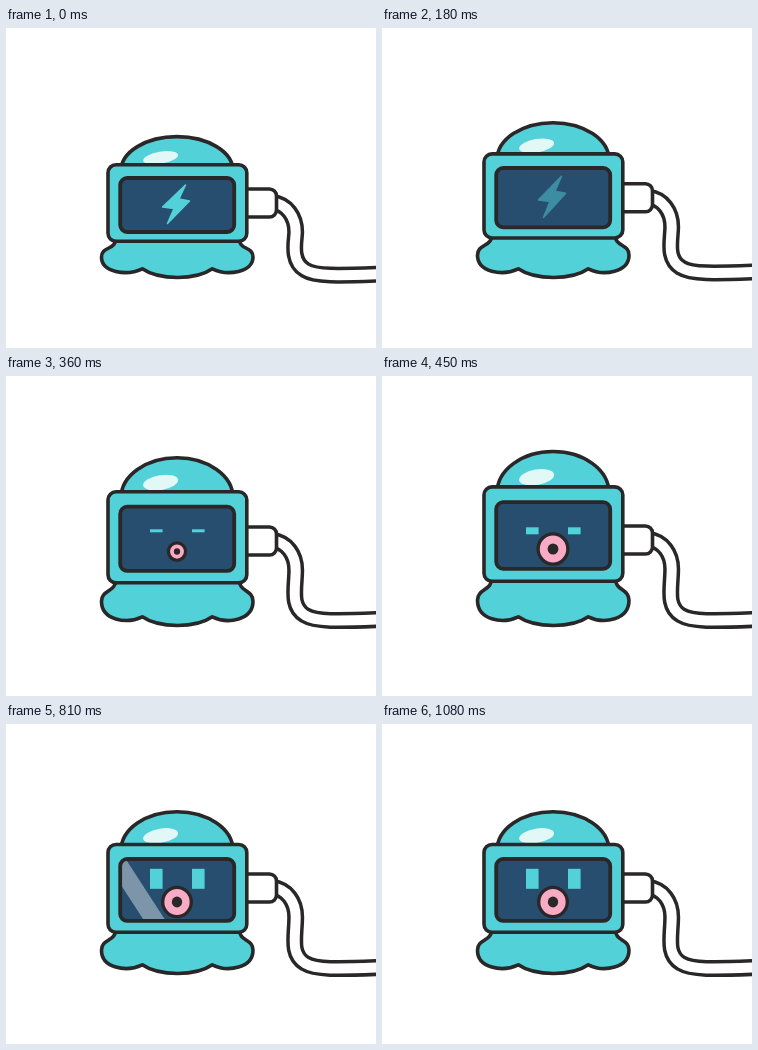
These frames come from a looping animation (370 by 320 pixels, 1480 ms). An HTML page with a canvas:

```html
<!DOCTYPE html>
<html lang="en">
<head>
<meta charset="utf-8">
<title>Charging robot</title>
<style>
html, body { margin: 0; width: 100%; height: 100%; overflow: hidden; background: #fff; }
canvas { display: block; width: 370px; height: 320px; }
</style>
</head>
<body>
<canvas id="stage" width="370" height="320"></canvas>
<script>
const ctx = document.getElementById('stage').getContext('2d');
const INK = '#2a2729', CYAN = '#53d1d9', NAVY = '#274e6e', PINK = '#f9abc5', GLOSS = '#e2f8f6';
const LOOP = 1480, STEP = 90, LAST = 12;

// One value per step; the last value holds.
const STRETCH = [0, .21, .42, .61, .81, 1, .82, .63];
const PLUG = [175, 172.5, 169.8, 166, 165, 164];
const CABLE = [246.8, 245.5, 244.6, 244.2];
const BOLT = [1, .77, .48, 0];
const EYES = [0, 0, 0, 0, 3, 7, 14, 20];
const MOUTH = [0, 0, 0, 0, .6, 1.04, 1.02, 1];
const at = (list, i) => list[Math.min(i, list.length - 1)];
const mix = (a, b, s) => a + (b - a) * s;

function paint(fill, width = 3.6) {
  if (fill) { ctx.fillStyle = fill; ctx.fill(); }
  if (width) { ctx.strokeStyle = INK; ctx.lineWidth = width; ctx.stroke(); }
}

function box(x0, y0, x1, y1, r) {
  ctx.beginPath();
  ctx.roundRect(x0, y0, x1 - x0, y1 - y0, r);
}

function oval(x, y, rx, ry, turn = 0) {
  ctx.beginPath();
  ctx.ellipse(x, y, rx, ry, turn, 0, Math.PI * 2);
}

function polygon(points) {
  ctx.beginPath();
  points.forEach(([x, y]) => ctx.lineTo(x, y));
  ctx.closePath();
}

function drawCable(y, end) {
  ctx.beginPath();
  ctx.moveTo(266, y - .5);
  ctx.bezierCurveTo(281, y + 1, 289.7, y + 14, 289.7, y + 29);
  ctx.bezierCurveTo(289.7, 212, 284, end - 14, 299, end - 5);
  ctx.bezierCurveTo(310, end + 2, 335, end + .7, 376, end - .8);
  for (const [color, width] of [[INK, 17], ['#fff', 10]]) {
    ctx.strokeStyle = color;
    ctx.lineWidth = width;
    ctx.stroke();
  }
  box(236, y - 14, 270.5, y + 14, [0, 7, 7, 0]);
  paint('#fff');
}

function drawSkirt(bottom, s) {
  const side = mix(229.3, 224.3, s);
  ctx.beginPath();
  ctx.moveTo(110, bottom - 4);
  ctx.bezierCurveTo(110, bottom + 10, 95.5, side - 12, 95.5, side);
  ctx.bezierCurveTo(95.5, 244, 120, 248.5, 136.3, 240.8);
  ctx.bezierCurveTo(153, 252.3, 190, 252.3, 206.3, 240.8);
  ctx.bezierCurveTo(222, 248.5, 247, 244, 247, side);
  ctx.bezierCurveTo(247, side - 12, 233, bottom + 10, 233, bottom - 4);
  paint(CYAN);
}

function drawDome(top, base, s) {
  const center = base + 6;
  ctx.beginPath();
  ctx.ellipse(171, center, 56, center - top, 0, Math.PI, 0);
  paint(CYAN);
  oval(154.6, mix(129.7, 101.2, s), 17.7, mix(6, 7.8, s), -.17);
  paint(GLOSS, 0);
}

function drawBolt(y, s, glow) {
  ctx.save();
  ctx.translate(171.5, y);
  ctx.scale(1, mix(1, 1.17, s));
  polygon([[8, -19.5], [-15, 2.5], [-3.5, 4], [-10, 19], [12, -3.5], [1.5, -5.5]]);
  ctx.fillStyle = ctx.strokeStyle = `color-mix(in srgb, ${CYAN} ${glow * 100}%, ${NAVY})`;
  ctx.lineWidth = 1.5;
  ctx.fill();
  ctx.stroke();
  ctx.restore();
}

function drawFace(i, s) {
  const h = at(EYES, i), size = at(MOUTH, i);
  if (!h) return;
  ctx.fillStyle = CYAN;
  for (const x of [144, 186]) ctx.fillRect(x, 154.8 - h / 2, 12.6, h);
  const y = mix(186.5, 173, s);
  oval(171, y, 14.3 * size, 14.6 * size);
  paint(PINK, 3.3);
  oval(171, y, 5.2 * size, 5.4 * size);
  paint(INK, 0);
}

function drawGlare(i) {
  const n = i - 10;
  if (n < -2 || n > 1) return;
  const dx = 41 * n + 3.5 * n * n;
  polygon([[135, 134], [156.5, 134], [198, 198], [176.5, 198]].map(([x, y]) => [x + dx, y]));
  ctx.fillStyle = 'rgba(255,255,255,.4)';
  ctx.fill();
}

function draw(i) {
  const s = at(STRETCH, i), glow = at(BOLT, i);
  const top = mix(136.8, 110.9, s), bottom = mix(213.3, 205.3, s);
  const screenTop = mix(150, 126.2, s), screenBottom = mix(204, 192.8, s);
  const screen = () => box(114.2, screenTop, 228.2, screenBottom, 7);

  ctx.fillStyle = '#fff';
  ctx.fillRect(0, 0, 370, 320);
  ctx.lineJoin = 'round';
  drawCable(at(PLUG, i), at(CABLE, i));
  drawSkirt(bottom, s);
  drawDome(mix(108.6, 75.5, s), top, s);
  box(102, top, 240.8, bottom, 8);
  paint(CYAN);

  screen();
  paint(NAVY, 0);
  ctx.save();
  ctx.clip();
  if (glow) drawBolt((screenTop + screenBottom) / 2 - .5, s, glow);
  drawFace(i, s);
  drawGlare(i);
  ctx.restore();
  screen();
  paint(null, 3.8);
}

function tick() {
  const t = performance.now() % LOOP;
  draw(Math.min(LAST, Math.floor(t / STEP)));
  requestAnimationFrame(tick);
}
tick();
</script>
</body>
</html>
```
